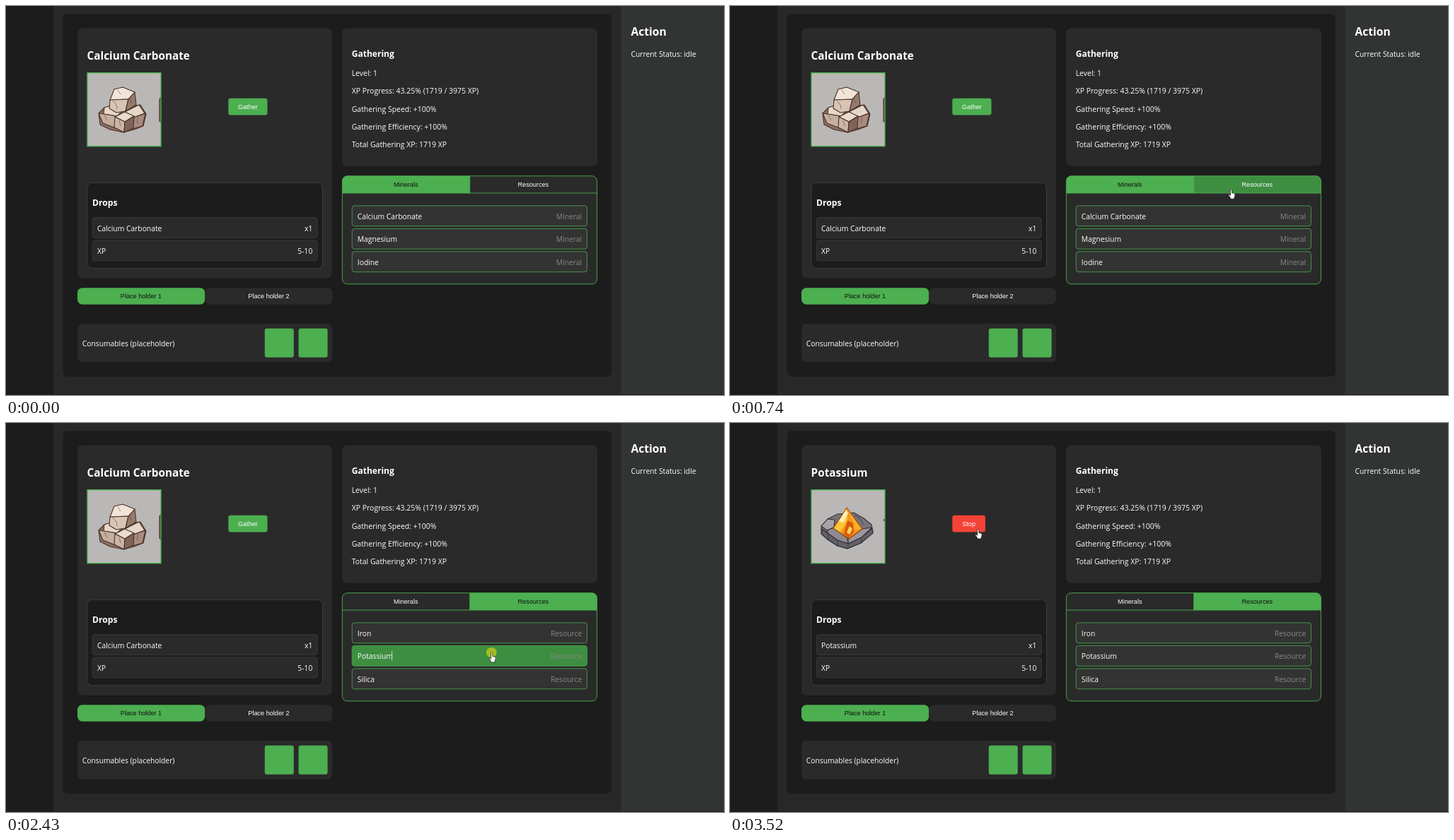
Write an HTML page that moves like this. It is 1015x551 px and loops after 8 s.

```html
<!DOCTYPE html>
<html lang="en">
<head>
<meta charset="utf-8">
<title>Gathering</title>
<style>
html, body { margin: 0; width: 100%; height: 100%; overflow: hidden; background: #1c1c1c; }
svg { display: block; width: 100vw; height: 100vh; }
text { font: 10.3px "Open Sans", "Noto Sans", sans-serif; fill: #fff; font-variant-ligatures: none; }
.stats text { font-size: 10.47px; }
.h2 { font-size: 15.3px; font-weight: 700; }
.h3 { font-size: 12.05px; font-weight: 700; }
.btn { font: 9.13px "Liberation Sans", Arial, sans-serif; text-anchor: middle; }
.end { text-anchor: end; }
.dim { fill: #888; }
.dark { fill: #111; }
.panel { fill: #2a2a2a; }
.green { fill: #4caf50; }
.row { fill: #2a2a2a; stroke: #444; stroke-width: .7; }
.item { fill: #333; stroke: #4caf50; stroke-width: .8; }
.line { fill: none; stroke: #4caf50; stroke-width: .9; }
.caret { stroke: #eee; stroke-width: .8; }
.cursor { fill: #fff; stroke: #111; stroke-width: .7; stroke-linejoin: round; }
</style>
</head>
<body>
<svg viewBox="0 0 1015 551">
  <rect width="1015" height="551" fill="#1c1c1c"/>
  <rect x="67" width="803" height="551" fill="#282828"/>
  <rect x="869.5" width="146" height="551" fill="#323434"/>
  <rect x="80.5" y="11" width="775.5" height="514" rx="7" fill="#1c1c1c"/>
  <rect y="550" width="1015" height="1" fill="#211b1c"/>

  <text class="h2" x="883.5" y="42" style="font-size:15.6px">Action</text>
  <text x="883.5" y="72">Current Status: idle</text>

  <rect class="panel" x="101" y="31.5" width="360" height="354" rx="7"/>
  <text class="h2" id="title" x="114.6" y="76.2"></text>
  <rect x="115" y="94.5" width="104" height="104" fill="#bab8b6"/>

  <g id="rocks" stroke="#49302a" stroke-width="1.1" stroke-linejoin="round">
    <path fill="#8b7064" d="M131 152l8-8 17-4 18 3 16-3 8 13-4 17-13 5-15 4-19-4-14-7z"/>
    <path fill="#e6d8c8" d="M139 144l12-4 13 9-7 7-19-3z"/>
    <path fill="#c5ae9d" d="M131 152l7 1 19 3-2 17-18-7z"/>
    <path fill="#e6d8c8" d="M168 150l20-10 8 12-16 6z"/>
    <path fill="#a88b7c" d="M180 158l17-6-4 18-14 4z"/>
    <path fill="#eadccb" d="M154 157l14-7 13 6-13 8z"/>
    <path fill="#cbb5a4" d="M154 157l14 7-1 15-14-7z"/>
    <path fill="#80645a" d="M168 164l13-8-1 17-13 6z"/>
    <path fill="#f0e5d6" d="M153 118l12-3 17 7-9 10-26 1z"/>
    <path fill="#d7c4b2" d="M147 133l26-1-4 17-13 2-10-6z"/>
    <path fill="#967a6c" d="M182 122l2 18-15 9 4-17z"/>
    <path fill="none" stroke-width=".5" d="M151 134l5 6 1 6M175 130l2 8M139 155l4 7M160 162l2 8M187 157l-2 9M158 119l4 6"/>
    <path fill="#6d5a4d" d="M219 129l-2 3v31l2 2z"/>
  </g>

  <g id="gem" stroke="#322f35" stroke-width="1.1" stroke-linejoin="round">
    <path fill="#77737a" d="M129 146l9-10 14-7 23-2 14 8 11 9 2 11-17 15-19 8-14-4-14-9-9-9z"/>
    <path fill="#a7a3a8" d="M129 146l9-10 10 1-1 11-10 4z"/>
    <path fill="#8e8a90" d="M137 152l10-4 19 15 1 8-15-5-13-9z"/>
    <path fill="#9b979d" d="M167 163l20-13 14-2-15 14-19 9z"/>
    <path fill="#626068" d="M130 150l9 7 13 9 15 5 19-9 15-13 1 7-17 14-19 8-14-4-14-9-9-8z"/>
    <path fill="none" stroke-width=".7" d="M139 157v9M152 166v8M167 171v7M185 162l1 8M176 130l8 6 5 8"/>
    <path fill="#f2961d" stroke="#8b3e0b" d="M165 120l22 30-19 14-22-15z"/>
    <path fill="#ffc43a" stroke="none" d="M165 121l-18 28 9 6 10-17z"/>
    <path fill="#fff1b5" stroke="none" d="M164 123l-10 16 6 2 7-13z"/>
    <path fill="#d95a08" stroke="none" d="M166 138l8 4 1 12-7 9-7-6z"/>
    <path fill="#ffad27" stroke="none" d="M166 122l20 28-10 2-2-12z"/>
    <path fill="#ffd45a" stroke="none" d="M169 146l4 4-4 8-4-3z"/>
    <path fill="#4b454a" stroke="none" d="M216.8 136h2v3h-2z"/>
  </g>
  <rect x="115" y="94.7" width="104" height="104" fill="none" stroke="#4caf50" stroke-width="1.4"/>

  <rect id="action" x="314.3" y="130.8" height="23.6" rx="3"/>
  <text class="btn" id="actionText" y="145.7"></text>

  <rect x="115" y="250.3" width="332.5" height="121.3" rx="7" fill="#1c1c1c" stroke="#444" stroke-width=".8"/>
  <text class="h3" x="122" y="283.3" style="font-size:12.2px">Drops</text>
  <rect class="row" x="122.2" y="299.6" width="318" height="28.8" rx="3.4"/>
  <rect class="row" x="122.2" y="331.9" width="318" height="28.8" rx="3.4"/>
  <text id="drop" x="129" y="318.6"></text>
  <text class="end" x="433.3" y="318.6">x1</text>
  <text x="129" y="351">XP</text>
  <text class="end" x="433.3" y="351">5-10</text>

  <rect class="green" x="101" y="399.2" width="180.3" height="23.6" rx="7"/>
  <rect class="panel" x="281.3" y="399.2" width="180" height="23.6" rx="7"/>
  <text class="btn dark" x="191" y="414.2">Place holder 1</text>
  <text class="btn" x="371.5" y="414.2">Place holder 2</text>

  <rect class="panel" x="101" y="450" width="360" height="54.5" rx="7"/>
  <text x="107.7" y="481.6">Consumables (placeholder)</text>
  <rect class="green" x="365.8" y="456.8" width="41" height="41" rx="3"/>
  <rect class="green" x="413.6" y="456.8" width="41" height="41" rx="3"/>

  <g class="stats">
    <rect class="panel" x="475" y="31.5" width="361" height="195" rx="7"/>
    <text class="h3" x="488.7" y="71.8" style="font-size:12.05px">Gathering</text>
    <text x="488.7" y="99">Level: 1</text>
    <text x="488.7" y="124.4">XP Progress: 43.25% (1719 / 3975 XP)</text>
    <text x="488.7" y="149.5">Gathering Speed: +100%</text>
    <text x="488.7" y="174.8">Gathering Efficiency: +100%</text>
    <text x="488.7" y="200">Total Gathering XP: 1719 XP</text>
  </g>

  <rect class="panel" x="475.4" y="240.7" width="360" height="153.2" rx="7"/>
  <path class="tab" d="M475.4 265V247.7a7 7 0 0 1 7-7H656V265z"/>
  <path class="tab" d="M655.6 265V240.7H828.4a7 7 0 0 1 7 7V265z"/>
  <path class="line" d="M475.4 265H835.4M655.8 240.7V265"/>
  <rect class="line" x="475.4" y="240.7" width="360" height="153.2" rx="7"/>
  <text class="btn tabText" x="565.3" y="256.2">Minerals</text>
  <text class="btn tabText" x="745.3" y="256.2">Resources</text>
  <g id="list"></g>

  <path class="caret" id="caret"/>
  <circle id="click" r="7.4" fill="#a4bb22"/>
  <path class="cursor" id="cursor"/>
</svg>
<script>
const LOOP = 8000;
const GREEN = '#4caf50', HOVER = '#3e8e41', PLAIN = '#2a2a2a';
const HAND = 'M-1.1 1.2a1.1 1.1 0 0 1 2.2 0V5.2l3.4.8q1 .4 1 1.5 0 2.5-1.1 4.6V13.7H-1.2V12.2L-3.6 8.8q-.6-1 .3-1.4.8-.2 1.4.6l.8 1z';
const ARROW = 'M0 0V9.8L2.3 7.8 3.9 11.3 5.4 10.6 3.9 7.2H7z';
const TABS = [
  { kind: 'Mineral', names: ['Calcium Carbonate', 'Magnesium', 'Iodine'] },
  { kind: 'Resource', names: ['Iron', 'Potassium', 'Silica'] }
];

// time, x, y, shape, hovered part (row index or 'tab')
const MOVES = [
  [70, 979, 539, ARROW], [140, 958, 503, ARROW], [200, 908, 443, ARROW],
  [270, 842, 388, ARROW], [340, 778, 346, ARROW], [400, 738, 319, HAND, 1],
  [470, 719, 301, HAND, 0], [540, 711, 292, HAND, 0], [600, 709.5, 276, ARROW],
  [670, 708.7, 264, HAND, 'tab'], [740, 708.5, 259.5, HAND, 'tab'],
  [1840, 705, 278, ARROW], [1910, 696.5, 305, HAND, 0],
  [1980, 689, 320, HAND, 1], [2060, 686.7, 325.3, HAND, 1],
  [2730, 655, 319, HAND, 1], [2800, 575, 297, HAND, 0], [2870, 478, 269.5, ARROW, 0],
  [2940, 425, 228, ARROW], [3010, 388, 194, ARROW], [3080, 365, 170, ARROW],
  [3150, 354, 156, ARROW], [3230, 350.7, 150.3, HAND]
];
const CLICKS = [[1400, 1480], [2430, 2510], [3450, 3520]];

const $ = id => document.getElementById(id);
const all = q => [...document.querySelectorAll(q)];
const set = (el, attrs) => { for (const k in attrs) el.setAttribute(k, attrs[k]); };
const show = (el, on) => { el.style.display = on ? '' : 'none'; };
const within = (t, [a, b]) => t >= a && t < b;

$('list').innerHTML = [0, 1, 2].map(i => {
  const y = 282.9 + i * 32.5;
  return `<rect class="item" x="489.2" y="${y}" width="332.2" height="28.8" rx="3.4"/>
    <text class="name" x="496.8" y="${y + 19}"></text>
    <text class="kind end dim" x="814.2" y="${y + 19}"></text>`;
}).join('');

const items = all('.item'), names = all('.name'), kinds = all('.kind');
const tabs = all('.tab'), tabTexts = all('.tabText');

function draw(t) {
  const move = MOVES.filter(m => m[0] <= t).pop();
  const [, x, y, shape, hover] = move || [];
  const active = t < 1480 ? 0 : 1;
  const chosen = t < 2510 ? 'Calcium Carbonate' : 'Potassium';
  const stop = t >= 3520;

  $('title').textContent = $('drop').textContent = chosen;
  show($('rocks'), t < 2510);
  show($('gem'), t >= 2510);

  set($('action'), { width: stop ? 46.6 : 55.2, fill: stop ? '#f44336' : GREEN });
  set($('actionText'), { x: stop ? 337.6 : 341.9 });
  $('actionText').textContent = stop ? 'Stop' : 'Gather';

  tabs.forEach((tab, i) => {
    const over = hover === 'tab' && i === 1;
    set(tab, { fill: over ? HOVER : i === active ? GREEN : PLAIN });
    tabTexts[i].classList.toggle('dark', i === active);
  });
  items.forEach((item, i) => {
    item.style.fill = hover === i ? HOVER : '';
    names[i].textContent = TABS[active].names[i];
    kinds[i].textContent = TABS[active].kind;
  });

  const first = within(t, [1400, 1480]);
  show($('caret'), first || within(t, [2430, 3450]));
  set($('caret'), { d: first ? 'M554.5 291V304.5' : 'M545.6 323V336.5' });

  show($('cursor'), move);
  show($('click'), CLICKS.some(c => within(t, c)));
  if (move) {
    set($('cursor'), { d: shape, transform: `translate(${x} ${y})` });
    set($('click'), { cx: x - .5, cy: y - .2 });
  }
}

const start = performance.now();
function tick() {
  draw((performance.now() - start) % LOOP);
  requestAnimationFrame(tick);
}
tick();
</script>
</body>
</html>
```
